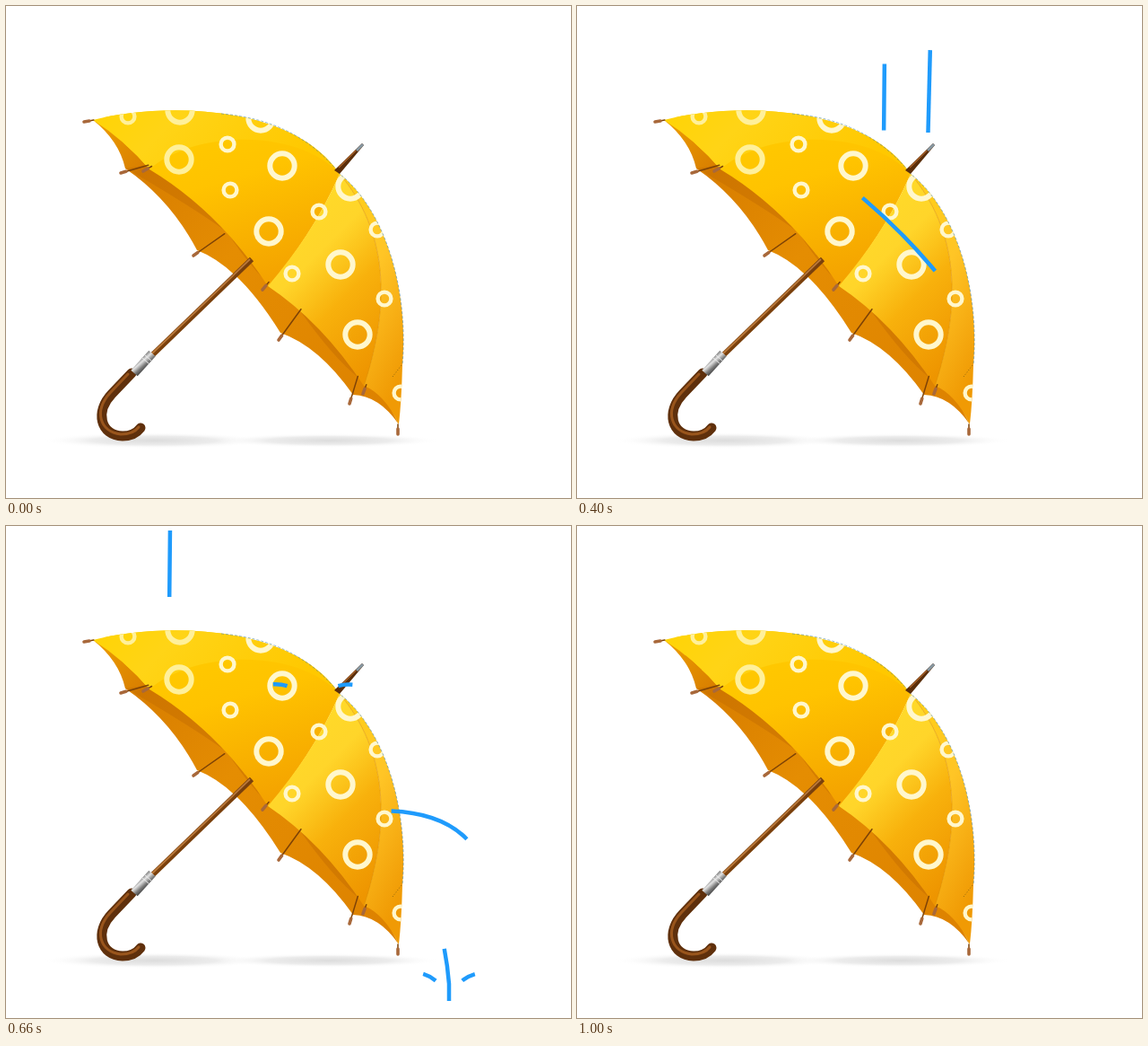
Recreate the animation shown at these times as an HTML page. Size 630x548 px, loop 1.02 s.

```html
<!DOCTYPE html>
<html lang="en">
<head>
<meta charset="utf-8">
<title>Umbrella in the rain</title>
<style>
html, body { margin: 0; width: 100%; height: 100%; overflow: hidden; background: #fff; }
svg { display: block; width: 630px; height: 548px; }
#rain path { fill: none; stroke: #1f9bfc; stroke-width: 4.5; }
</style>
</head>
<body>
<svg viewBox="0 0 630 548">
  <defs>
    <linearGradient id="top" x1="0" y1="0" x2="1" y2="0.3">
      <stop offset="0" stop-color="#ffd400"/><stop offset="0.4" stop-color="#ffd416"/><stop offset="1" stop-color="#ffc800"/>
    </linearGradient>
    <linearGradient id="main" x1="0.2" y1="0" x2="0.6" y2="1">
      <stop offset="0" stop-color="#ffcf00"/><stop offset="0.5" stop-color="#ffc300"/><stop offset="1" stop-color="#f4a300"/>
    </linearGradient>
    <linearGradient id="side" x1="0.25" y1="0.05" x2="0.75" y2="1">
      <stop offset="0" stop-color="#ffdc28"/><stop offset="0.35" stop-color="#ffd52a"/><stop offset="0.62" stop-color="#f8b10c"/><stop offset="1" stop-color="#ee9500"/>
    </linearGradient>
    <linearGradient id="edge" x1="0" y1="0" x2="0.5" y2="1">
      <stop offset="0" stop-color="#ffd016"/><stop offset="0.5" stop-color="#ffc526"/><stop offset="1" stop-color="#f09a04"/>
    </linearGradient>
    <linearGradient id="under" gradientUnits="userSpaceOnUse" x1="110" y1="130" x2="430" y2="450">
      <stop offset="0" stop-color="#eb9a00"/><stop offset="0.15" stop-color="#d87e00"/><stop offset="0.45" stop-color="#e58d02"/><stop offset="1" stop-color="#dd8200"/>
    </linearGradient>
    <linearGradient id="steel" gradientUnits="userSpaceOnUse" x1="148" y1="393" x2="157" y2="403">
      <stop offset="0" stop-color="#666"/><stop offset="0.35" stop-color="#e4e4e4"/><stop offset="0.7" stop-color="#7c7c7c"/><stop offset="1" stop-color="#444"/>
    </linearGradient>
    <radialGradient id="shade">
      <stop offset="0" stop-color="#dcdcdc"/><stop offset="0.55" stop-color="#ececec"/><stop offset="1" stop-color="#fff" stop-opacity="0"/>
    </radialGradient>
    <clipPath id="canopy">
      <path d="M97 127C170 108 318 107 372 187C424 228 449 318 442 400Q441 440 438 466Q422 432 399 423Q352 352 292 312Q238 229 160 182Q133 150 97 127Z"/>
    </clipPath>
  </defs>

  <ellipse cx="165" cy="484" rx="125" ry="9" fill="url(#shade)"/>
  <ellipse cx="360" cy="484" rx="125" ry="8" fill="url(#shade)"/>

  <path fill="url(#under)" d="M97 127Q126 150 133 181Q183 215 213 272Q260 290 306 364Q349 379 387 433Q416 434 438 466L400 390L240 200Z"/>
  <path fill="#c26a00" opacity=".45" d="M134 181L158 177L250 230L247 252Q205 222 134 181M247 252L300 300L326 337Q280 305 247 252M326 337L395 395L393 414Q365 392 326 337"/>

  <g clip-path="url(#canopy)">
    <path fill="url(#main)" d="M90 100H372V187Q345 250 292 314L160 190Z"/>
    <path fill="url(#top)" d="M90 100H372V187C325 136 210 138 160 182L90 135Z"/>
    <path fill="url(#side)" d="M372 187Q345 250 292 312L399 425C430 330 425 250 372 187"/>
    <path fill="url(#edge)" d="M372 187C425 250 430 330 399 423L438 468L450 400V187Z"/>
    <path fill="none" stroke="#d98a00" opacity=".55" d="M372 187C425 250 430 330 399 423"/>
    <g id="rings" fill="none"></g>
  </g>
  <path fill="none" stroke="#4f86a0" stroke-width=".8" stroke-dasharray="3 2" opacity=".75" d="M240 120Q325 127 372 187C424 228 449 318 442 400"/>
  <path stroke="#8a6410" stroke-dasharray="1 2" d="M431 413L441 400"/>

  <path fill="#5a2e0a" d="M366 183L372 187L399 155L397 153Z"/>
  <path stroke="#a8622a" stroke-width="1.5" d="M371 180L390 161"/>
  <path stroke="#8797a2" stroke-width="3" d="M391 161L398 154"/>

  <g id="ribs" stroke-linecap="round"></g>

  <g fill="none">
    <path stroke="#7a400c" stroke-width="6" d="M274 282L164 388"/>
    <path stroke="#b9783a" stroke-width="1.8" d="M272 282L163 387"/>
    <path stroke="#5f300c" stroke-width="11" stroke-linecap="round" d="M140 409L118 432C99 452 105 478 130 479C142 479 147 474 150 470"/>
    <path stroke="#99551c" stroke-width="3" stroke-linecap="round" d="M136 410L116 431C98 451 104 474 128 477Q142 477 148 469"/>
    <path stroke="url(#steel)" stroke-width="10" d="M163 387L143 409"/>
    <path stroke="#eee" d="M154 388L163 396M151 391L160 399"/>
  </g>

  <g id="rain"></g>
</svg>
<script>
const STEP = 20, LOOP = 1020;

function add(parent, tag, attrs) {
  const el = document.createElementNS("http://www.w3.org/2000/svg", tag);
  for (const k in attrs) el.setAttribute(k, attrs[k]);
  document.getElementById(parent).append(el);
  return el;
}

// Rings come in two sizes and are paler towards the left.
function rings(r, width, centres) {
  for (const [cx, cy] of centres)
    add("rings", "circle", { cx, cy, r, stroke: cx < 200 ? "#fff09a" : "#fff7cd", "stroke-width": width });
}
rings(13.7, 6, [[194, 116], [193, 171], [284, 125], [308, 178], [293, 251], [384, 201], [373, 288], [392, 366]]);
rings(7.4, 4.4, [[136, 123], [247, 154], [250, 205], [349, 229], [319, 298], [414, 249], [422, 326], [440, 431]]);

// A rib runs from its capped tip up to the canopy.
function rib([x, y], angle, length) {
  const a = angle * Math.PI / 180;
  const line = n => `M${x} ${y}l${n * Math.cos(a)} ${-n * Math.sin(a)}`;
  add("ribs", "path", { d: line(length), stroke: "#7d4206", "stroke-width": 1.5 });
  add("ribs", "path", { d: line(6), stroke: "#a8683a", "stroke-width": 3.6 });
}
[[87, 129], [153, 184], [286, 316], [398, 432], [437, 477]].forEach((tip, i) => rib(tip, 10 + 20 * i, 11));
[[128, 186], [209, 278], [304, 372], [383, 443]].forEach((tip, i) => rib(tip, 16 + 19 * i, 32 + 12 * Math.sin(i * Math.PI / 3)));

function streak(d) {
  const el = add("rain", "path", { d }), total = el.getTotalLength();
  const show = (head, size) => {
    const a = Math.max(0, head - size), b = Math.min(total, head);
    el.style.display = b > a ? "" : "none";
    el.setAttribute("stroke-dasharray", `0 ${a} ${Math.max(0, b - a)} 9999`);
  };
  return { total, show };
}

// A drop of the given size slides along its path from start to end; it splashes at hit.
function drop(d, size, start, end, ease, x, y, hit) {
  const fall = streak(d);
  const arms = ["c-8 -14 -22 -32 -51 -27", "c9 -16 24 -34 56 -25"].map(arc => streak(`M${x} ${y}${arc}`));
  return t => {
    const u = Math.min(1, Math.max(0, (t - start) / (end - start)));
    fall.show((fall.total + size) * (u + ease * u * u * (1 - u)), size);
    const age = t - hit, head = age > 0 && age < 258 ? age * 0.3 : 0;
    for (const arm of arms) arm.show(head, 16);
  };
}

const drops = [
  drop("M279 0L277 181Q345 231 395 290Q434 336 459 385Q489 444 494 510V529", 115, 148, 752, 0.65, 494, 525, 527),
  drop("M343.5 0L341.5 203", 74, 158, 642, 0, 342, 204, 475),
  drop("M395 0L387 320C413 316 473 312 510 345Q541 374 553 425Q557 446 557.5 480", 92, 276, 928, 0.5, 557, 481, 736),
  drop("M183 0L181.5 150", 74, 523, 911, 0, 182, 150, 740)
];

function draw(now) {
  const t = Math.floor(now % LOOP / STEP) * STEP;
  for (const show of drops) show(t);
  requestAnimationFrame(draw);
}
requestAnimationFrame(draw);
</script>
</body>
</html>
```
